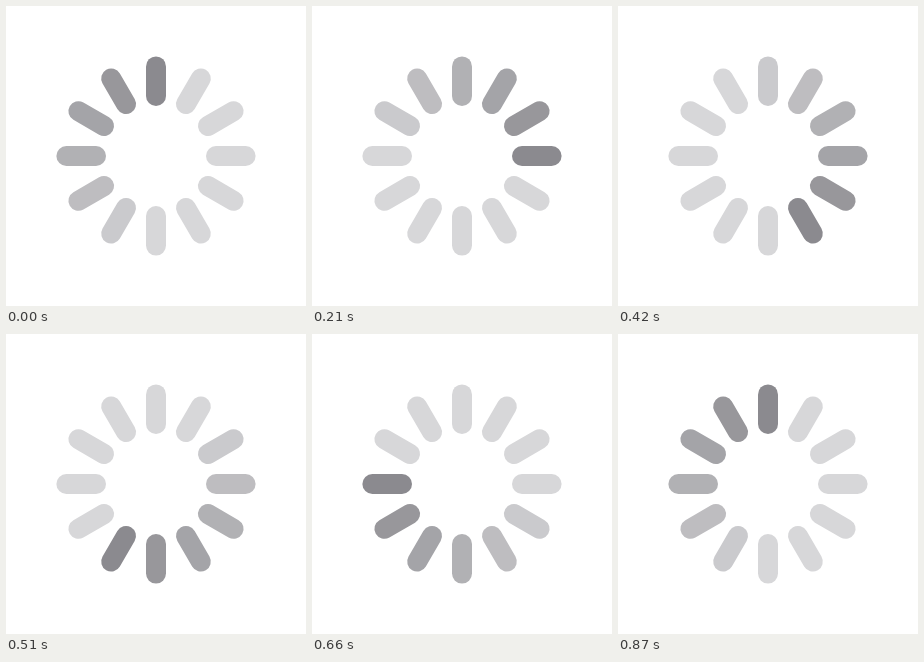
An HTML page with a canvas for the animation above (900 ms loop, 300 by 300 pixels).

```html
<!DOCTYPE html>
<html lang="en">
<head>
<meta charset="utf-8">
<title>Loading spinner</title>
<style>
  html, body { margin: 0; width: 100%; height: 100%; overflow: hidden; background: #fff; }
  canvas { display: block; width: 100vw; height: 100vh; }
</style>
</head>
<body>
<canvas id="stage" width="300" height="300"></canvas>
<script>
const ctx = document.getElementById('stage').getContext('2d');
const LOOP = 900;
const BARS = 12;
const TAIL = 6;
const DARK = [139, 138, 143];
const LIGHT = [215, 215, 217];
// Moments at which the dark head moves one bar clockwise.
const STEPS = [60, 120, 210, 300, 360, 450, 510, 600, 660, 750, 810, 870];

function shade(age) {
  const k = Math.min(age / TAIL, 1);
  return `rgb(${DARK.map((c, i) => Math.round(c + (LIGHT[i] - c) * k))})`;
}

function drawBar(index, color) {
  ctx.save();
  ctx.translate(150, 150);
  ctx.rotate(index * 2 * Math.PI / BARS);
  ctx.strokeStyle = color;
  ctx.beginPath();
  ctx.moveTo(0, -60);
  ctx.lineTo(0, -89.6);
  ctx.stroke();
  ctx.restore();
}

function draw(time) {
  const head = STEPS.filter(step => step <= time).length;
  ctx.fillStyle = '#fff';
  ctx.fillRect(0, 0, 300, 300);
  ctx.lineWidth = 20;
  ctx.lineCap = 'round';
  for (let i = 0; i < BARS; i++) {
    drawBar(i, shade((head - i + BARS) % BARS));
  }
}

const start = performance.now();
function tick() {
  draw((performance.now() - start) % LOOP);
  requestAnimationFrame(tick);
}
tick();
</script>
</body>
</html>
```
